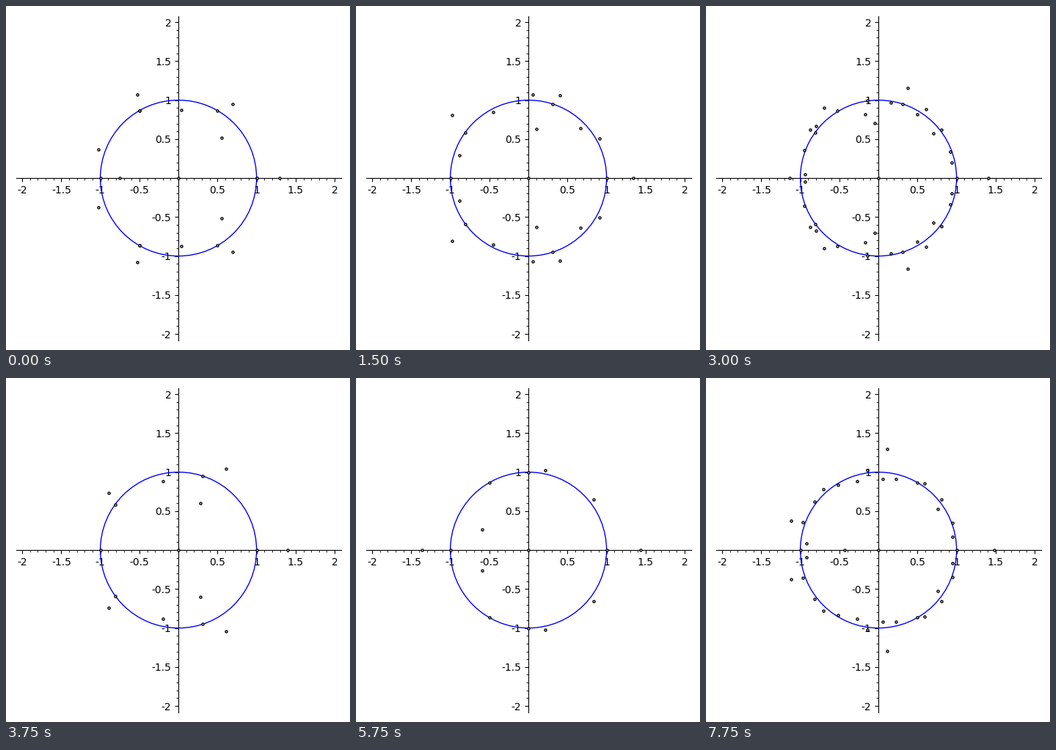
Write a matplotlib script that moves like this. It is 469 px wide and 470 px high and loops after 8 s.

```python
"""Eigenvalues of the core entropy matrix for periodic external angles."""
from itertools import combinations
from math import gcd

import numpy as np
import matplotlib.pyplot as plt
from matplotlib.animation import FuncAnimation
from matplotlib.ticker import FuncFormatter, MultipleLocator

W, H, DPI = 469, 470, 100
UNIT = 106.5            # pixels per unit
CX, CY = 235.1, 234.9   # origin, from the lower left corner
REACH = 2.08
FRAMES, INTERVAL = 32, 250
MAX_DENOM, MAX_DEGREE = 39, 80


def angle_list():
    """Smallest fractions k/n with odd n, in increasing order."""
    fracs = [(k, n) for n in range(3, MAX_DENOM + 1, 2)
             for k in range(1, n) if gcd(k, n) == 1]
    return sorted(fracs, key=lambda f: f[0] / f[1])[:FRAMES]


def orbit(k, n):
    xs = [k]
    while 2 * xs[-1] % n != k:
        xs.append(2 * xs[-1] % n)
    return xs


def pair_map(k, n):
    """Images of each pair of orbit points; index `size` means no image."""
    xs = orbit(k, n)
    p = len(xs)
    pairs = list(combinations(range(p), 2))
    size = len(pairs)
    index = np.full((p, p), size)
    for m, (i, j) in enumerate(pairs):
        index[i, j] = index[j, i] = m
    side = [0 if 2 * x in (k, k + n) else (1 if k < 2 * x < k + n else -1)
            for x in xs]
    first, second = [], []
    for i, j in pairs:
        a, b = (i + 1) % p, (j + 1) % p
        if side[i] * side[j] < 0:
            first.append(index[0, a])
            second.append(index[0, b])
        else:
            first.append(index[a, b])
            second.append(size)
    return size, np.array(first), np.array(second)


def char_poly(k, n):
    """Leading integer coefficients, from power traces (Newton identities)."""
    size, first, second = pair_map(k, n)
    power = np.zeros((size + 1, size), dtype=np.int64)
    power[:size] = np.eye(size, dtype=np.int64)
    coef, traces = [1], []
    for m in range(1, min(size, MAX_DEGREE) + 1):
        power[:size] = power[first] + power[second]
        traces.append(int(np.trace(power[:size])))
        total = sum(coef[m - 1 - i] * t for i, t in enumerate(traces))
        coef.append(-total // m)
    return size, coef


def eigenvalues(k, n):
    size, coef = char_poly(k, n)
    while coef[-1] == 0:
        coef.pop()
    roots = np.roots(np.array(coef, dtype=float))
    if len(coef) - 1 < size:
        roots = np.append(roots, 0)
    return np.column_stack([roots.real, roots.imag])


def tick_label(v, _):
    return "" if abs(v) < 1e-9 else f"{v:g}"


def make_axes(fig):
    r = REACH * UNIT
    ax = fig.add_axes([(CX - r) / W, (CY - r) / H, 2 * r / W, 2 * r / H])
    ax.set_xlim(-REACH, REACH)
    ax.set_ylim(-REACH, REACH)
    ax.patch.set_visible(False)
    for name in ("left", "bottom"):
        ax.spines[name].set_position("zero")
    for name in ("right", "top"):
        ax.spines[name].set_visible(False)
    for axis in (ax.xaxis, ax.yaxis):
        axis.set_major_locator(MultipleLocator(0.5))
        axis.set_minor_locator(MultipleLocator(0.1))
        axis.set_major_formatter(FuncFormatter(tick_label))
    return ax


plt.rcParams.update({"font.family": "DejaVu Sans", "font.size": 10})
fig = plt.figure(figsize=((W + 1e-6) / DPI, (H + 1e-6) / DPI), dpi=DPI,
                 facecolor="white")
ax = make_axes(fig)
ax.add_patch(plt.Circle((0, 0), 1, fill=False, ec="blue", lw=1, zorder=3))

root_sets = [eigenvalues(k, n) for k, n in angle_list()]
dots = ax.scatter([], [], s=5, facecolors="white", edgecolors="black",
                  linewidths=1, zorder=5)


def draw(i):
    dots.set_offsets(root_sets[i])
    return (dots,)


anim = FuncAnimation(fig, draw, frames=FRAMES, interval=INTERVAL,
                     repeat=True, repeat_delay=0)
plt.show()
```
